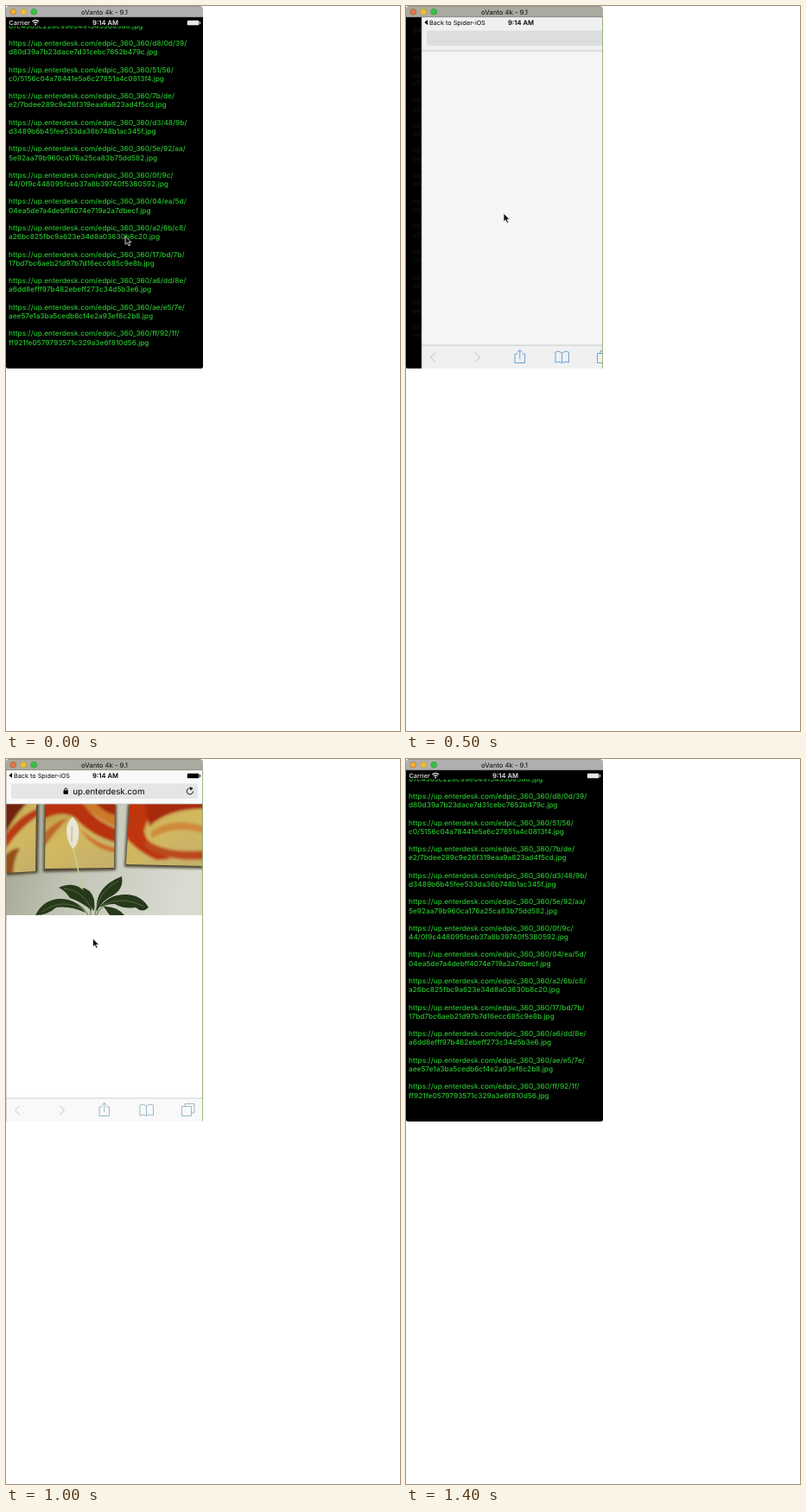
Recreate the animation shown at these times as an HTML page. Size 456 px wide and 840 px high, loop 1500 ms.

```html
<!DOCTYPE html>
<html lang="en">
<head>
<meta charset="utf-8">
<title>Simulator app switch</title>
<style>
  html, body { margin: 0; width: 100%; height: 100%; overflow: hidden; background: #fff; }
  svg { display: block; }
  text { font-family: Inter, Roboto, sans-serif; white-space: pre; text-rendering: geometricPrecision; }
  .mid { text-anchor: middle; }
  .line { fill: none; }
</style>
</head>
<body>
<svg width="456" height="840" viewBox="0 0 456 840">
  <defs>
    <clipPath id="win"><path d="M0 13H228V417.500Q228 420 225.500 420H2.500Q0 420 0 417.500Z"/></clipPath>
    <clipPath id="log"><rect x="0" y="23.200" width="228" height="397"/></clipPath>
    <clipPath id="shot"><rect x="0" y="52" width="228" height="129"/></clipPath>
    <clipPath id="art1"><path d="M0 52H35L34 130L0 132Z"/></clipPath>
    <clipPath id="art2"><path d="M46 52H126L125 126L45 127Z"/></clipPath>
    <clipPath id="art3"><path d="M143 52H228V124L139 122Z"/></clipPath>
    <filter id="soft"><feGaussianBlur stdDeviation="1.6"/></filter>
    <linearGradient id="wall" x2="1" y2=".15">
      <stop offset="0" stop-color="#a2a48f"/>
      <stop offset=".45" stop-color="#c4c6b9"/>
      <stop offset="1" stop-color="#dadbd1"/>
    </linearGradient>
    <linearGradient id="art" x2=".6" y2="1">
      <stop offset="0" stop-color="#b58f3c"/>
      <stop offset=".5" stop-color="#d3b95f"/>
      <stop offset="1" stop-color="#c5b06a"/>
    </linearGradient>
    <g id="battery">
      <rect x="209.800" y="16.800" width="13.600" height="5.400" rx="1"/>
      <rect x="224" y="18.300" width="1.100" height="2.400" rx=".5"/>
    </g>
  </defs>

  <g clip-path="url(#win)">
    <rect y="13" width="228" height="407"/>
    <g id="term">
      <g fill="#e8e8e8">
        <text x="3.500" y="22" font-size="7.300" font-weight="500">Carrier</text>
        <text class="mid" x="115" y="22" font-size="7.600" font-weight="600">9:14 AM</text>
        <use href="#battery"/>
        <path class="line" stroke="#e8e8e8" stroke-width="1.200" d="M30.300 18Q34.200 14.600 38.100 18M31.900 19.800Q34.200 17.800 36.500 19.800"/>
        <circle cx="34.200" cy="21.400" r="1"/>
      </g>
      <g id="links" fill="#27c32d" font-size="8.250" font-weight="500" clip-path="url(#log)"></g>
    </g>
    <rect id="dim" y="13" width="228" height="407"/>

    <g id="page">
      <rect y="13" width="228" height="407" fill="#fff"/>
      <path d="M0 13H228V52H0ZM0 393H228V420H0Z" fill="#f9f9f9"/>
      <rect x="6" y="28.500" width="216" height="17.500" rx="3" fill="#e4e5e5"/>
      <path d="M3.400 19L7 16V22Z"/>
      <text x="9" y="22" font-size="7.250">Back to Spider-iOS</text>
      <text class="mid" x="115" y="22" font-size="7.600" font-weight="600">9:14 AM</text>
      <use href="#battery"/>

      <g id="content">
        <rect x="66.500" y="36.300" width="5.400" height="4.400" rx=".6"/>
        <path class="line" stroke="#000" d="M67.700 36.500V35.200Q69.200 32 70.700 35.200V36.500"/>
        <text x="77.300" y="40.500" font-size="9.750">up.enterdesk.com</text>
        <path class="line" stroke="#111" d="M214.800 34.300A3.600 3.600 0 1 0 216.500 37.400"/>
        <path d="M213 32.300L216.700 34L213.300 36.400Z"/>

        <g clip-path="url(#shot)">
          <rect y="52" width="228" height="129" fill="url(#wall)"/>
          <path d="M0 52H38L37 132L0 135ZM44 52H128L127 129L43 131ZM141 52H228V127L137 125Z" fill="#4f4730" filter="url(#soft)"/>
          <g clip-path="url(#art1)"><g filter="url(#soft)">
            <rect x="-6" y="46" width="46" height="92" fill="url(#art)"/>
            <path d="M-6 46H30Q10 62 -6 98Z" fill="#6f230d"/>
            <path d="M-6 96Q12 66 40 56V64Q16 78 -6 112Z" fill="#b83a14"/>
            <path d="M-6 116Q10 100 16 104Q8 116 8 138H-6Z" fill="#94501c"/>
          </g></g>
          <g clip-path="url(#art2)"><g filter="url(#soft)">
            <rect x="40" y="46" width="92" height="88" fill="url(#art)"/>
            <path d="M40 46H86Q100 72 132 82V98Q98 90 80 68Q62 58 40 72Z" fill="#b8300f"/>
            <path d="M84 46H132V80Q104 72 84 46Z" fill="#cc7a2a"/>
            <path d="M100 46H132V66Q112 64 100 46Z" fill="#a32a0e"/>
            <path d="M40 90Q56 72 72 68Q56 84 40 108Z" fill="#c0682a"/>
            <path d="M84 78Q102 99 132 104V109Q100 107 84 78Z" fill="#cc702a"/>
          </g></g>
          <g clip-path="url(#art3)"><g filter="url(#soft)">
            <rect x="134" y="46" width="100" height="84" fill="url(#art)"/>
            <path d="M134 46H186Q162 66 160 84Q164 102 190 116L174 117Q146 104 134 84Z" fill="#bf3611"/>
            <path d="M160 46H234V58Q190 56 166 78Q162 62 160 46Z" fill="#a82a0e"/>
            <path d="M168 84Q196 64 234 80V88Q198 74 168 92Z" fill="#cf8a3a"/>
            <path d="M164 94Q184 110 234 106V116Q178 120 160 100Z" fill="#bb4a1a"/>
          </g></g>
          <path class="line" stroke="#c6cc98" stroke-width="1.600" d="M77.500 102Q83 128 88.500 150"/>
          <path d="M77 67Q86 75 84 91Q82 102 77 104Q70 95 70 81Q71 72 77 67Z" fill="#e9e5d3"/>
          <path class="line" stroke="#c9bd8e" stroke-width="1.400" d="M76.500 78L76 96"/>
          <g class="line" stroke="#6f8450" stroke-width="1.200">
            <path d="M72 165Q88 167 95 181M88 150Q98 162 98 181M112 163Q104 170 103 181M116 170Q108 172 105 181"/>
          </g>
          <g fill="#263a1b">
            <path d="M34 181Q46 158 72 163Q84 166 92 178Q74 170 58 172Q48 181 34 181Z"/>
            <path d="M61 149Q82 140 92 156L100 176Q88 166 74 161Q68 152 61 149Z"/>
            <path d="M89 149Q105 154 102 176Q91 164 89 149Z"/>
            <path d="M134 136Q137 151 122 159Q111 164 105 177Q102 148 134 136Z"/>
            <path d="M108 172Q120 156 140 157Q157 158 165 172Q158 179 150 172Q136 174 126 168Q116 168 108 172Z"/>
            <path d="M113 171Q128 170 137 181H120Z"/>
          </g>
          <path class="line" stroke="#5d7345" stroke-width=".8" d="M42 177Q66 160 90 175M67 150Q88 152 98 172M130 141Q109 153 105 172M112 169Q136 158 160 171"/>
        </g>
      </g>

      <rect id="load" y="50.300" width="28" height="1.700" fill="#5687e6"/>
      <path class="line" stroke="#c0c2c2" stroke-width=".8" d="M0 52H228M0 393H228"/>
      <path class="line" stroke="#c3c5c6" d="M16 401.500L10.500 407L16 412.500M62 401.500L67.500 407L62 412.500"/>
      <g id="tools" class="line" stroke-width=".9">
        <path d="M111 403H108V413.500H119.500V403H116.500M113.800 409V398.500M111 401.300L113.800 398.300L116.600 401.300"/>
        <g id="more">
          <path d="M162.500 402Q159 398.500 155 401V413Q159 411 162.500 413.500Q166 411 170.500 413V401Q166 398.500 162.500 402V413.500"/>
          <path d="M203.500 402.500H214.500V413.500H203.500ZM207 402.500V399.500H218V410H214.500"/>
        </g>
      </g>
      <rect id="shade" y="13" width="228" height="407"/>
      <path class="line" stroke="#aaa" stroke-width=".6" d="M.3 13V420"/>
    </g>
    <path id="edge" class="line" stroke="#8fae72" d="M227.600 13V420"/>
  </g>

  <path id="bar" d="M0 13V4Q0 0 4 0H224Q228 0 228 4V13Z"/>
  <path class="line" stroke="#777" stroke-width=".6" d="M3 .3H225M0 12.700H228"/>
  <circle id="red" cx="8.300" cy="6.700" r="3.500" stroke="#8a5a2a" stroke-width=".5"/>
  <circle cx="20.300" cy="6.700" r="3.500" fill="#f2bd35" stroke="#b08a2c" stroke-width=".5"/>
  <circle cx="32.300" cy="6.700" r="3.500" fill="#38c147" stroke="#2c9138" stroke-width=".5"/>
  <text class="mid" x="114" y="9.600" font-size="7.700" font-weight="500" fill="#222">oVanto 4k - 9.1</text>

  <path id="cursor" d="M0 0V9.800L2.300 7.700L3.900 11.300L5.600 10.500L4 7.100H7Z" fill="#111" stroke="#eee" stroke-width=".8"/>
</svg>
<script>
const $ = id => document.getElementById(id);
const set = (id, name, value) => $(id).setAttribute(name, value);

const base = 'https://up.enterdesk.com/edpic_360_360/';
const links = [
  ['', '67c4565c228c99e0491543568388.jpg'],
  ['d8/0d/39/', 'd80d39a7b23dace7d31cebc7652b479c.jpg'],
  ['51/56/', 'c0/5156c04a78441e5a6c27851a4c0813f4.jpg'],
  ['7b/de/', 'e2/7bdee289c9e26f319eaa9a823ad4f5cd.jpg'],
  ['d3/48/9b/', 'd3489b6b45fee533da36b748b1ac345f.jpg'],
  ['5e/92/aa/', '5e92aa79b960ca176a25ca83b75dd582.jpg'],
  ['0f/9c/', '44/0f9c448095fceb37a8b39740f5380592.jpg'],
  ['04/ea/5d/', '04ea5de7a4debff4074e719a2a7dbecf.jpg'],
  ['a2/6b/c8/', 'a26bc825fbc9a623e34d8a03630b8c20.jpg'],
  ['17/bd/7b/', '17bd7bc6aeb21d97b7d16ecc685c9e8b.jpg'],
  ['a6/dd/8e/', 'a6dd8efff97b482ebeff273c34d5b3e6.jpg'],
  ['ae/e5/7e/', 'aee57e1a3ba5cedb6cf4e2a93ef8c2b8.jpg'],
  ['ff/92/1f/', 'ff921fe0579793571c329a3e6f810d56.jpg']
];

function addLine(str, y) {
  const el = document.createElementNS('http://www.w3.org/2000/svg', 'text');
  el.setAttribute('x', 3);
  el.setAttribute('y', y);
  el.textContent = str;
  $('links').append(el);
}
links.forEach(([dir, file], i) => {
  const y = 46 + 30.58 * (i - 1);
  if (i) addLine(base + dir, y);
  addLine(file, y + 10.2);
});

const clamp = v => Math.max(0, Math.min(1, v));

// Critically damped spring, settling a little early
function spring(ms) {
  const u = 0.015 * Math.max(0, ms);
  return clamp(1.045 * (1 - (1 + u) * Math.exp(-u)));
}

// time, x, y
const trail = [[0, 138, 266.5], [400, 138, 266.5], [600, 88, 214], [800, 55, 18], [900, 55, 18], [1100, 146, 398]];

function pointer(t) {
  const i = trail.findIndex(k => k[0] >= t);
  if (i < 0) return null;
  if (!i) return trail[0].slice(1);
  const [a, b] = [trail[i - 1], trail[i]];
  const k = (t - a[0]) / (b[0] - a[0]);
  return [a[1] + (b[1] - a[1]) * k, a[2] + (b[2] - a[2]) * k];
}

function draw(t) {
  const leaving = t >= 1000;
  const p = leaving ? 1 - spring(t - 1073) : spring(t - 255);
  const web = t >= 500 && t < 1200;

  set('term', 'transform', `translate(114 216.5) scale(${1 - 0.046 * p}) translate(-114 -216.5)`);
  set('dim', 'opacity', p * (leaving ? 0.45 : 0.95));
  set('page', 'transform', `translate(${228 * (1 - p)})`);
  set('page', 'visibility', p > 0.005 ? 'visible' : 'hidden');
  set('shade', 'opacity', leaving ? 0 : 0.23 * (1 - p * p));
  set('content', 'opacity', clamp((t - 500) / 160));
  set('load', 'opacity', t === 600 ? 1 : 0);
  set('tools', 'stroke', t < 500 ? '#bbbdbe' : t < 700 ? '#5fa0da' : '#8fb0c2');
  set('more', 'opacity', t < 500 ? 0 : 1);
  set('edge', 'opacity', p > 0.5 ? 1 : 0);
  set('bar', 'fill', web ? '#a9aba0' : '#b0b0b0');
  set('red', 'fill', web ? '#e4774f' : '#f5ae35');

  const at = pointer(t);
  set('cursor', 'visibility', at ? 'visible' : 'hidden');
  if (at) set('cursor', 'transform', `translate(${at})`);
}

const start = performance.now();
function tick() {
  const t = (performance.now() - start) % 1500;
  draw(Math.floor(t / 100) * 100);
  requestAnimationFrame(tick);
}
tick();
</script>
</body>
</html>
```
